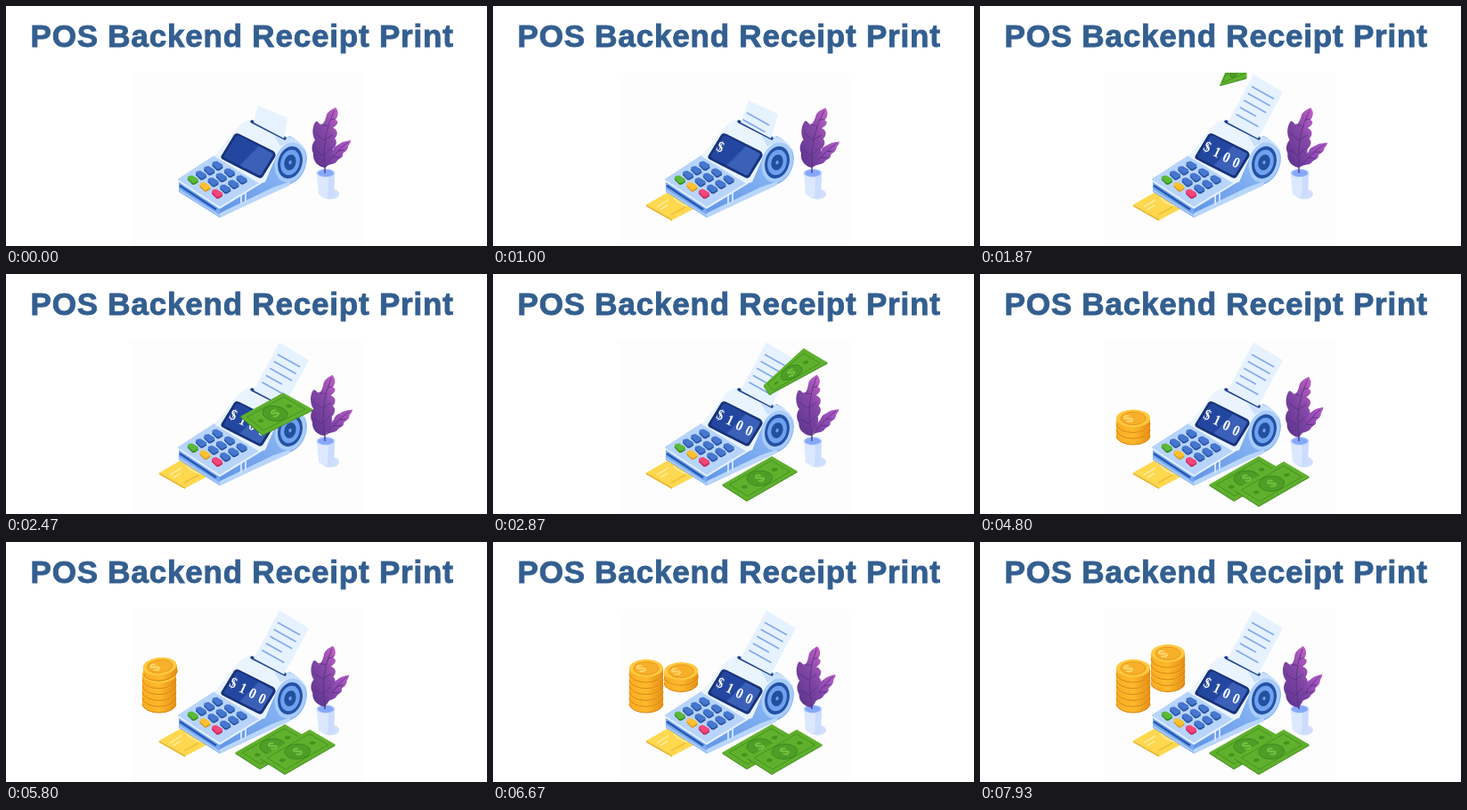
An HTML page that plays this animation: 540 by 270 pixels, repeating every 8000 ms.

```html
<!DOCTYPE html>
<html lang="en">
<head>
<meta charset="utf-8">
<title>Receipt print</title>
<style>
html, body { margin: 0; width: 100%; height: 100%; overflow: hidden; background: #fff; }
svg { display: block; width: 100vw; height: 100vh; }
.title { font: bold 35px "Liberation Sans", Arial, sans-serif; letter-spacing: .8px; fill: #335f90; stroke: #335f90; stroke-width: .9; }
.digit { font: bold 16px "Liberation Serif", serif; fill: #fff; text-anchor: middle; }
.mark { font: bold 19px "Liberation Sans", sans-serif; text-anchor: middle; }
</style>
</head>
<body>
<svg viewBox="0 0 540 270">
  <defs>
    <clipPath id="scene"><rect x="140" y="75" width="260" height="195"/></clipPath>
    <clipPath id="paperClip"><path id="paperShape"/></clipPath>
    <linearGradient id="leafA" x1=".9" y1="0" x2=".2" y2="1">
      <stop stop-color="#c05fc6"/><stop offset=".45" stop-color="#8347a6"/><stop offset="1" stop-color="#5f3590"/>
    </linearGradient>
    <linearGradient id="leafB" x1="1" y1="0" x2="0" y2="1">
      <stop stop-color="#b65cc8"/><stop offset="1" stop-color="#6a3a9c"/>
    </linearGradient>
    <linearGradient id="side" x1="0" y1="1" x2="1" y2="0">
      <stop stop-color="#5f94e6"/><stop offset="1" stop-color="#9cc4fa"/>
    </linearGradient>
    <linearGradient id="glass" x1="0" y1="0" x2="1" y2=".8">
      <stop offset=".55" stop-color="#2347a0"/><stop offset=".58" stop-color="#3a60b8"/>
    </linearGradient>
    <linearGradient id="gold"><stop stop-color="#f9ac22"/><stop offset=".5" stop-color="#fdb92c"/><stop offset="1" stop-color="#e58d14"/></linearGradient>
  </defs>
  <text class="title" x="27.5" y="46">POS Backend Receipt Print</text>
  <g clip-path="url(#scene)">
    <rect x="140" y="75" width="260" height="195" fill="#fdfdfd"/>
    <g id="coins"></g>
    <g id="card">
      <path d="M172 223.500L215 199L245 218L201 241Z" fill="#fed84f"/>
      <path d="M172 223.500L201 240L201 242L172 225.500Z" fill="#eab533"/>
      <path d="M184 226l13-8M188 229l8-5M203 216q6 8 19 9" stroke="#fff1b4" stroke-width="1.2" fill="none"/>
      <path d="M200 235l16-9" stroke="#f4bf38" stroke-width="1.500"/>
    </g>

    <g id="terminal">
      <path d="M194 196L240 226L240 238L194 209Z" fill="#78a8f0"/>
      <path d="M195 202L236 229" stroke="#2459b2" stroke-width="2.500"/>
      <path d="M194 207L240 236" stroke="#a9cbfb" stroke-width="2"/>
      <path d="M240 224L284 196L302 158L318 146Q338 156 338 172Q336 194 318 201L240 238Z" fill="url(#side)"/>
      <path d="M240 233L300 204L320 197L318 202L240 238Z" fill="#b9d6fc"/>
      <path d="M264 211v13M269 208v13" stroke="#cfe1ff" stroke-width="2"/>
      <path d="M194 195L234 169L286 199L240 225Z" fill="#b7d4fc" stroke="#b7d4fc" stroke-width="2" stroke-linejoin="round"/>
      <path d="M194 197L240 227L286 199" fill="none" stroke="#e6f1ff" stroke-width="2"/>
      <path d="M234 169L259 138Q267 127 278 128L313 146Q332 151 338 165L330 156Q310 152 303 170L291 198L285 200Z" fill="#eaf4ff"/>
      <path d="M301 146L313 146Q332 151 338 165Q326 148 308 158Z" fill="#cbe1fd"/>
      <path d="M242 168L256 145Q258 142 262 144L300 163Q304 166 302 170L289 191Q287 195 283 193L244 173Q240 171 242 168Z" fill="#173279"/>
      <path d="M245 168L258 147Q259 145 262 146L298 165Q301 166 299 169L287 189Q286 191 283 190L246 171Q244 170 245 168Z" fill="url(#glass)"/>
      <path d="M276 130L313 149" stroke="#1d3f8e" stroke-width="3.500" stroke-linecap="round"/>
      <g transform="rotate(16 319 176)">
        <ellipse cx="319" cy="176" rx="17" ry="23" fill="#a8ccfb"/>
        <ellipse cx="319" cy="176" rx="13.500" ry="18.500" fill="#2552a6"/>
        <ellipse cx="319" cy="176" rx="10.500" ry="14.500" fill="#6fa2ee"/>
        <ellipse cx="319" cy="176" rx="6.500" ry="9" fill="#234f9f"/>
        <ellipse cx="319" cy="176" rx="1.600" ry="2.200" fill="#6fa2ee"/>
      </g>
      <g id="keys"></g>
      <g id="digits"></g>
    </g>

    <g clip-path="url(#paperClip)">
      <rect x="270" y="70" width="80" height="85" fill="#e6f2ff"/>
      <path id="lines" stroke="#83a9ee" stroke-width="1.700" fill="none"/>
    </g>

    <g id="plant">
      <ellipse cx="364" cy="211.500" rx="10" ry="6" fill="#cfdffd"/>
      <path d="M349 188L351 212Q360 219 368 212L369 188Z" fill="#dbe8ff"/>
      <path d="M362 192L369 188L368 212Q365 216 361 216Z" fill="#cbdcfe"/>
      <ellipse cx="359" cy="188" rx="10.500" ry="5" fill="#c3d7ff"/>
      <ellipse cx="359" cy="188" rx="9" ry="4" fill="#85a8fb"/>
      <path d="M358 188L358 174" stroke="#4f2d80" stroke-width="1.300"/>
      <g id="leafRight">
        <path d="M359 181C362 176 362 168 367 163C368 157 373 157 376 154C380 152 383 152 387 151C387 155 384 156 384 159C383 163 380 164 378 166C379 171 374 171 372 174C369 179 363 177 359 181Z" fill="url(#leafB)"/>
        <path d="M359 181Q368 166 384 153M367 170l8 0M373 163l7-1" stroke="#56307f" stroke-width=".8" fill="none"/>
      </g>
      <g id="leafLeft">
        <path d="M358 182C350 181 344 174 345 166C342 160 344 154 347 151C343 144 344 136 347 131C349 127 352 133 354 134C358 131 359 126 360 122C363 117 367 116 370 114C374 119 373 124 370 128C375 130 371 135 367 137C374 140 372 146 369 149C373 153 370 158 367 161C368 168 364 176 358 182Z" fill="url(#leafA)"/>
        <path d="M358 182Q354 146 369 117M356 168l-9-6M356 168l9-8M357 151l-10-8M357 151l10-6M361 135l-8-2M364 128l5-1" stroke="#56307f" stroke-width=".8" fill="none"/>
      </g>
    </g>
    <g id="bills"></g>
  </g>
</svg>
<script>
const LOOP = 8000;
const $ = id => document.getElementById(id);
const clamp = x => Math.max(0, Math.min(1, x));
const mix = (a, b, k) => a + (b - a) * k;
const smooth = k => k * k * (3 - 2 * k);
const easeOut = k => 1 - (1 - k) * (1 - k);

function add(parent, tag, attrs = {}, text) {
  const el = document.createElementNS("http://www.w3.org/2000/svg", tag);
  for (const name in attrs) el.setAttribute(name, attrs[name]);
  if (text) el.textContent = text;
  return parent.appendChild(el);
}
const set = (el, name, value) => el.setAttribute(name, value);
const show = (el, on) => set(el, "visibility", on ? "visible" : "hidden");

// Keyframes: [time, ...values]
function track(keys, t, ease = smooth) {
  let i = 0;
  while (i < keys.length - 2 && t >= keys[i + 1][0]) i++;
  const [a, b] = [keys[i], keys[i + 1]];
  const k = ease(clamp((t - a[0]) / (b[0] - a[0])));
  return a.slice(1).map((v, j) => mix(v, b[j + 1], k));
}

// Keypad
for (let row = 0; row < 4; row++) for (let col = 0; col < 3; col++) {
  const x = 210 + col * 13.6 + row * 9.2, y = 195.5 + col * 7.8 - row * 5.3;
  const fill = row ? "#4677cf" : ["#5cb83a", "#fdc02f", "#f2467a"][col];
  const dark = row ? "#24509f" : ["#358a22", "#dd951c", "#c4265a"][col];
  const shape = "M-6-1Q-7-3-4-4L-1-4.500L5-1Q7 1 5 2L2 4Q0 4.500-1 4Z";
  add($("keys"), "path", { d: shape, fill: dark, transform: `translate(${x} ${y + 1.3})` });
  add($("keys"), "path", { d: shape, fill, transform: `translate(${x} ${y - .5})` });
}

const digits = [..."$100"].map((c, i) => add($("digits"), "text", {
  class: "digit",
  transform: `matrix(.82 .42 -.45 .95 ${253 + i * 10.8} ${163.5 + i * 5.9})`
}, c));

// Coins
const PITCH = 6.8;
const coins = Array.from({ length: 11 }, (_, i) => {
  const left = i < 6, level = left ? i : i - 6;
  const el = add($("coins"), "g");
  add(el, "path", { d: "M-19 0V6A19 10 0 0 0 19 6V0Z", fill: "url(#gold)" });
  add(el, "path", { d: "M-19 6A19 10 0 0 0 19 6", fill: "none", stroke: "#d9830f", "stroke-width": 1 });
  add(el, "ellipse", { rx: 19, ry: 10, fill: "#fec840" });
  add(el, "ellipse", { rx: 14, ry: 7.2, fill: "#f8b02b", stroke: "#e8981c", "stroke-width": 1 });
  add(el, "text", { class: "mark", fill: "#ffdc72", transform: "matrix(.75 -.3 .5 .55 -2.500 4)" }, "$");
  return { el, start: 3560 + 408 * i, x: left ? 172 : 211, y: (left ? 176 : 152.5) - level * PITCH };
});

function drawCoin({ el, start, x, y }, t) {
  const p = t - start;
  show(el, p > 0);
  if (p <= 0) return;
  const fall = clamp(p / 150), settle = smooth(clamp((p - 150) / 140));
  const top = mix(52, y - 3, fall * fall) + 3 * settle;
  const tilt = mix(-24, -9, fall) * (1 - settle);
  set(el, "transform", `translate(${x + 1 - settle} ${top}) rotate(${tilt})`);
}

// Bills: corners left, top, right, bottom over the time of one fall
const FALL = [
  [0, 304, 52, 322, 14, 324, 60, 297, 68],
  [70, 304, 79, 327, 42, 327, 87, 297, 95],
  [270, 304, 124, 349, 82, 376, 98, 310, 134],
  [800, 287, 180, 336, 158, 372, 178, 318, 204],
  [1030, 285, 243, 341, 211, 370, 228, 313, 261]
];
const bills = [[1800, -28, -6], [2590, 0, 0]].map(([start, dx, dy]) => {
  const el = add($("bills"), "g", { transform: `translate(${dx} ${dy})` });
  const part = (fill, stroke) => add(el, "path", { fill, stroke, "stroke-width": 1 });
  return {
    el, start,
    edge: part("#3f8a20", "none"),
    face: part("#5fb02d", "none"),
    frame: part("none", "#46931f"),
    disc: part("#4d9e26", "#3c8a1f"),
    spots: part("#46931f", "none"),
    mark: add(el, "text", { class: "mark", fill: "#7cc544" }, "$")
  };
});

function drawBill(b, t) {
  const p = t - b.start;
  show(b.el, p > 0);
  if (p <= 0) return;
  const c = track(FALL, p, k => k);
  const at = (u, v) => [0, 1].map(i =>
    mix(mix(c[i], c[2 + i], u), mix(c[6 + i], c[4 + i], u), v));
  const poly = pts => "M" + pts.map(q => at(...q).map(n => n.toFixed(2)).join(" ")).join("L") + "Z";
  const box = m => poly([[m, m * 1.7], [1 - m, m * 1.7], [1 - m, 1 - m * 1.7], [m, 1 - m * 1.7]]);
  const disc = (u, v, r) => poly(Array.from({ length: 20 }, (_, i) => {
    const a = i * Math.PI / 10;
    return [u + r * Math.cos(a) * .55, v + r * Math.sin(a)];
  }));
  set(b.face, "d", box(0));
  set(b.edge, "d", box(0));
  set(b.edge, "transform", "translate(0 1)");
  set(b.frame, "d", box(.08));
  set(b.disc, "d", disc(.5, .5, .34));
  set(b.spots, "d", disc(.2, .5, .08) + disc(.8, .5, .08));
  const [x, y] = at(.5, .5), flat = clamp((p - 270) / 760);
  set(b.mark, "transform", `translate(${x} ${y}) matrix(.72 ${mix(-.5, -.34, flat)} ${mix(.25, .5, flat)} .55 0 0) translate(0 6.500)`);
}

// Receipt grows out of the slot
function drawReceipt(t) {
  const k = clamp((t - 860) / 880);
  const x = mix(283, 307, k), y = mix(112, 77, k);
  const drop = mix(14, 20, k);
  set($("paperShape"), "d", `M${x} ${y}L${x + 33} ${y + drop}L312 149L278 131Z`);
  let d = "";
  for (let i = 0; i < 5; i++) {
    const lx = x - 2 - i * 4.4, ly = y + 13.5 + i * 7.8;
    d += `M${lx} ${ly}l${i == 3 ? 18 : 25} ${i == 3 ? 10 : 14}`;
  }
  set($("lines"), "d", d);
  show($("lines"), k > 0);
}

// Leaf angles in degrees: left, right
const SWAY = [
  [0, 0, 0], [900, 2.5, 3], [1870, 1, 5], [2870, -5, 2], [3730, -4, -1],
  [4800, -1, -2.5], [5700, -2.5, -3], [6670, -5, -4], [8000, -6, -4.5]
];
function drawPlant(t) {
  const [a, b] = track(SWAY, t);
  const sink = 4 * clamp((t - 3700) / 2600);
  set($("leafLeft"), "transform", `rotate(${a} 358 187) translate(0 ${sink})`);
  set($("leafRight"), "transform", `rotate(${b} 358 187)`);
}

function draw(t) {
  const far = 1 - easeOut(clamp((t - 70) / 800));
  set($("card"), "transform", `translate(${-78 * far} ${46 * far})`);
  show($("card"), t >= 70);
  digits.forEach((el, i) => show(el, t >= 930 + i * 130));
  drawReceipt(t);
  drawPlant(t);
  bills.forEach(b => drawBill(b, t));
  coins.forEach(c => drawCoin(c, t));
}

const begin = performance.now();
function tick() {
  draw((performance.now() - begin) % LOOP);
  requestAnimationFrame(tick);
}
tick();
</script>
</body>
</html>
```
